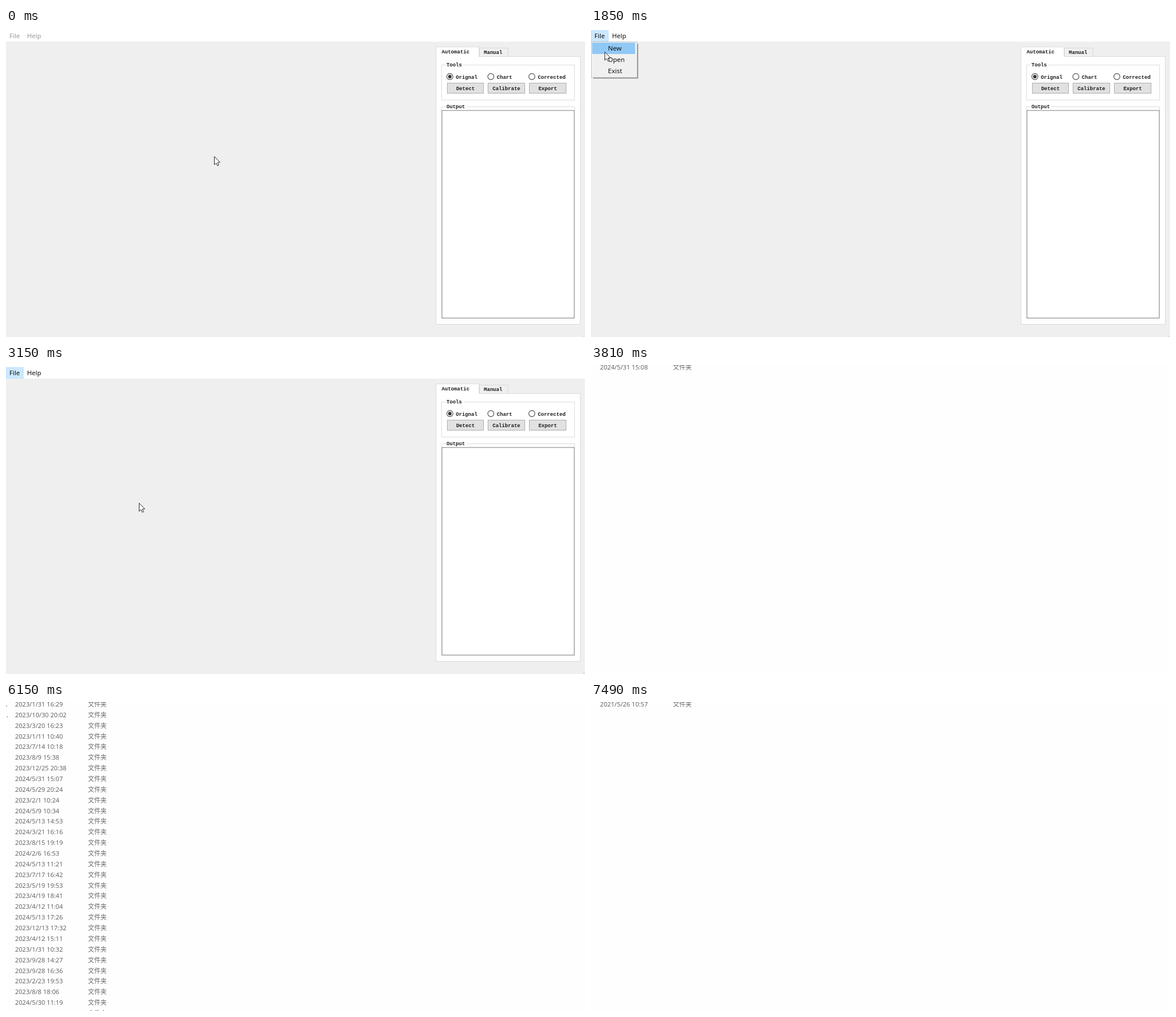
Write an HTML page with a canvas that moves like this. It is 1024x547 px and loops after 8000 ms.

```html
<!DOCTYPE html>
<html lang="en">
<head>
<meta charset="utf-8">
<title>Chart calibration tool</title>
<style>
  html, body { margin: 0; width: 100%; height: 100%; overflow: hidden; background: #fefefe; }
  canvas { display: block; }
</style>
</head>
<body>
<canvas id="stage" width="1024" height="547"></canvas>
<script>
const ctx = document.getElementById('stage').getContext('2d');
const LOOP = 8000;
const MENU = '11.5px "Noto Sans", "Open Sans", sans-serif';
const MONO = 'bold 9.1px "Liberation Mono", "DejaVu Sans Mono", monospace';
const DATE = '11.2px "Noto Sans", "Open Sans", sans-serif';
const CJK = '11px "Noto Sans CJK SC", "Noto Sans CJK", sans-serif';
const ROW = 18.86;

const CLICK_AT = 1330, CLOSE_AT = 2450, DIALOG_AT = 3178, CURSOR_END = 3810;

const EASE = {
  both: u => u * u * (3 - 2 * u),
  in: u => u * u,
  out: u => 1 - (1 - u) ** 2
};

// Pointer path: time, x, y, easing on the way there
const PATH = [
  [120, 368, 227], [960, 10, 34, 'both'], [1290, 14, 12, 'both'], [1410, 14, 13, 'both'],
  [1850, 24, 42, 'both'], [2500, 34, 38, 'both'], [2660, 92, 120, 'in'],
  [3180, 238, 247, 'out'], [3530, 238, 247, 'both'], [3740, 119, 62, 'both']
];
// Bursts of pointer movement: start, step, end
const BURSTS = [[190, 70, 960], [1030, 75, 1780], [1850, 75, 2600], [2660, 74, 3400], [3600, 70, 3810]];

const FOLDERS = [
  '2023/1/31 16:29', '2023/10/30 20:02', '2023/3/20 16:23', '2023/1/11 10:40',
  '2023/7/14 10:18', '2023/8/9 15:38', '2023/12/25 20:38', '2024/5/31 15:07',
  '2024/5/29 20:24', '2023/2/1 10:24', '2024/5/9 10:34', '2024/5/13 14:53',
  '2024/3/21 16:16', '2023/8/15 19:19', '2024/2/6 16:53', '2024/5/13 11:21',
  '2023/7/17 16:42', '2023/5/19 19:53', '2023/4/19 18:41', '2023/4/12 11:04',
  '2024/5/13 17:26', '2023/12/13 17:32', '2023/4/12 15:11', '2023/1/31 10:32',
  '2023/9/28 14:27', '2023/9/28 16:36', '2023/2/23 19:53', '2023/8/8 18:06',
  '2024/5/30 11:19', ''
];

function rect(x, y, w, h, fill) {
  ctx.fillStyle = fill;
  ctx.fillRect(x, y, w, h);
}

function box(x, y, w, h, fill, line) {
  if (fill) rect(x, y, w, h, fill);
  ctx.strokeStyle = line;
  ctx.lineWidth = 1;
  ctx.strokeRect(x + 0.5, y + 0.5, w - 1, h - 1);
}

function text(str, x, y, font, color, align = 'left') {
  ctx.font = font;
  ctx.fillStyle = color;
  ctx.textAlign = align;
  ctx.fillText(str, x, y);
}

function label(str, x, y, align) {
  text(str, x, y, MONO, '#1c1c1c', align);
}

function group(title, y, h, gap) {
  box(770, y, 236, h, null, '#dcdcdc');
  rect(777, y, gap, 1, '#fff');
  label(title, 779, y + 3);
}

function radio(x, name, on) {
  ctx.beginPath();
  ctx.arc(x, 86, 5.4, 0, Math.PI * 2);
  ctx.fillStyle = '#fff';
  ctx.fill();
  ctx.strokeStyle = '#444';
  ctx.lineWidth = 1.1;
  ctx.stroke();
  if (on) {
    ctx.beginPath();
    ctx.arc(x, 86, 3.1, 0, Math.PI * 2);
    ctx.fillStyle = '#333';
    ctx.fill();
  }
  label(name, x + 10.5, 89.5);
}

function button(x, w, name) {
  box(x, 97, w, 19, '#e1e1e1', '#adadad');
  label(name, x + w / 2, 110, 'center');
}

function panel() {
  box(760, 50, 256, 475, '#fff', '#dcdcdc');
  box(837, 35, 51, 16, '#f0f0f0', '#d9d9d9');
  box(760, 33, 77, 18, '#fff', '#dcdcdc');
  rect(761, 50, 75, 1, '#fff');
  label('Automatic', 770.5, 45);
  label('Manual', 845, 45.5);

  group('Tools', 65, 63, 32);
  radio(785, 'Orignal', true);
  radio(857.5, 'Chart');
  radio(930, 'Corrected');
  button(780, 65, 'Detect');
  button(852, 66, 'Calibrate');
  button(925, 66, 'Export');

  group('Output', 139, 375, 37);
  box(770.5, 145.5, 235, 368.5, '#fff', '#777a80');
  rect(1021, 545, 2, 1, '#bbb');
}

function menu(y) {
  rect(4, 28, 80, 62, 'rgba(0,0,0,.14)');
  rect(4, 28, 79, 61, 'rgba(0,0,0,.36)');
  box(0, 24, 82, 64, '#f0f0f0', '#c4c4c4');
  const picked = y < 26 ? -1 : Math.min(2, Math.floor((y - 26) / 20));
  if (picked >= 0) rect(2, 26 + picked * 20, 76, 20, '#90c8f6');
  ['New', 'Open', 'Exist'].forEach((name, i) => text(name, 30, 40 + i * 20, MENU, '#111'));
}

function appWindow(t, pos) {
  rect(0, 0, 1024, 547, '#efefef');
  rect(0, 0, 1024, 24, '#fff');
  const active = t >= CLICK_AT;
  if (active || (t > 1030 && pos[1] < 24)) box(0, 4, 31, 20, '#cce8ff', '#b9e0ff');
  const ink = active ? '#111' : '#999';
  text('File', 6, 18, MENU, ink);
  text('Help', 37.2, 18, MENU, ink);
  panel();
  if (active && t < CLOSE_AT) menu(pos[1]);
}

function folderRow(i, date) {
  const y = 8 + i * ROW;
  text(date, 16, y, DATE, '#666');
  text('文件夹', 145, y, CJK, '#666');
}

function highlight(i, color, alpha) {
  ctx.globalAlpha = alpha;
  rect(0, -5.4 + i * ROW, 316, 19.8, color);
  ctx.globalAlpha = 1;
}

function folderList(t) {
  const fade = t < 5880 ? 0 : Math.min(4, 1 + Math.floor((t - 5880) / 90)) / 4;
  highlight(7, '#d9d9d9', 1 - fade);
  if (fade) highlight(0, '#e5f3ff', 1 - fade);
  FOLDERS.forEach((date, i) => folderRow(i, date));
  text('.', -0.5, 8, DATE, '#444');
  text('..', -2, 8 + ROW, DATE, '#444');
}

function dialog(t) {
  rect(0, 0, 1024, 547, '#fefefe');
  if (t < 5480) {
    folderRow(0, '2024/5/31 15:08');
  } else if (t < 6810) {
    folderList(t);
  } else {
    if (t >= 7090 && t < 7490) {
      ctx.globalAlpha = Math.min(3, 1 + Math.floor((t - 7090) / 70)) / 3;
      box(0, 0, 183, 43, '#fbfbfb', '#e2e2e2');
      ctx.globalAlpha = 1;
    }
    folderRow(0, '2021/5/26 10:57');
  }
}

function stepTime(t) {
  let held = 0;
  for (const [start, step, end] of BURSTS) {
    if (t < start) break;
    held = Math.min(end, start + Math.floor((t - start) / step) * step);
  }
  return held;
}

function pointer(t) {
  const i = PATH.findIndex(p => p[0] > t);
  if (i === 0) return PATH[0].slice(1, 3);
  if (i < 0) return PATH[PATH.length - 1].slice(1, 3);
  const [t0, x0, y0] = PATH[i - 1], [t1, x1, y1, ease] = PATH[i];
  const k = EASE[ease]((t - t0) / (t1 - t0));
  return [Math.round(x0 + (x1 - x0) * k), Math.round(y0 + (y1 - y0) * k)];
}

function drawPointer([x, y]) {
  const shape = [[0, 0], [0, 14.5], [3.3, 11.5], [5.6, 16.3], [7.8, 15.3], [5.7, 10.6], [10, 10.3]];
  ctx.beginPath();
  shape.forEach(([dx, dy]) => ctx.lineTo(x + 0.5 + dx, y + 0.5 + dy));
  ctx.closePath();
  ctx.fillStyle = '#fff';
  ctx.fill();
  ctx.strokeStyle = '#222';
  ctx.lineWidth = 1;
  ctx.stroke();
}

function draw(t) {
  const pos = pointer(stepTime(t));
  if (t < DIALOG_AT) appWindow(t, pos);
  else dialog(t);
  if (t < CURSOR_END) drawPointer(pos);
}

const begin = performance.now();
function tick() {
  draw((performance.now() - begin) % LOOP);
  requestAnimationFrame(tick);
}
tick();
</script>
</body>
</html>
```
